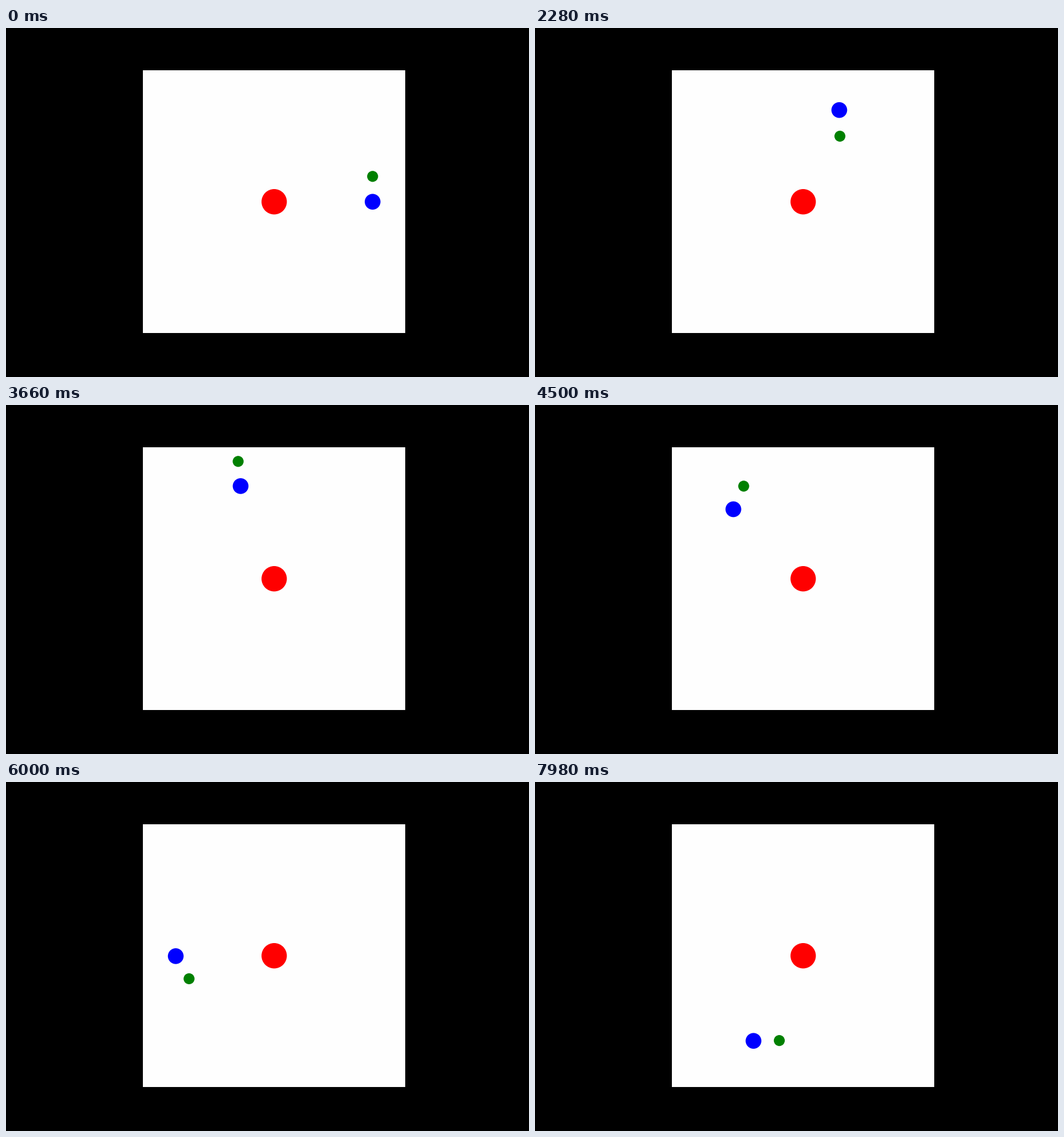
Animation of 917 by 611 pixels, one loop 8 s. Source, as a matplotlib script:

```python
import numpy as np
import matplotlib.pyplot as plt
from matplotlib.animation import FuncAnimation
from matplotlib.patches import Circle, Rectangle

W, H, DPI = 917, 611, 100
LOOP, TICK = 8000, 20      # ms
TICKS_PER_STEP = 3         # the bodies advance every 60 ms

SUN = np.array([470.2, 304.2])
PLANET_ORBIT = 172.6
MOON_ORBIT = 44.9
PLANET_RATE = np.radians(1.8022)   # per step
MOON_RATE = np.radians(23.712)
APSIS_RATE = np.radians(0.2)
ECC = 0.023


def polar(r, angle):
    return r * np.array([np.cos(angle), -np.sin(angle)])


def planet_at(step):
    return SUN + polar(PLANET_ORBIT, PLANET_RATE * step)


def moon_at(step):
    """Slightly eccentric orbit about the planet, disturbed by the sun's tide."""
    mean = np.pi / 2 + MOON_RATE * step
    anomaly = (MOON_RATE - APSIS_RATE) * step
    tide = 2 * (mean - PLANET_RATE * step - np.pi)
    angle = (mean + 2 * ECC * np.sin(anomaly)
             + 0.0105 * np.sin(tide)
             + 0.0087 * np.sin(tide - anomaly))
    r = MOON_ORBIT * (1 - ECC * np.cos(anomaly)
                      - 0.0077 * np.cos(tide)
                      - 0.004 * np.cos(tide - anomaly))
    return planet_at(step) + polar(r, angle)


fig = plt.figure(figsize=(W / DPI, H / DPI), dpi=DPI, facecolor="black")
ax = fig.add_axes([0, 0, 1, 1])
ax.set_xlim(0, W)
ax.set_ylim(H, 0)
ax.axis("off")

ax.add_patch(Rectangle((240, 74), 460, 459.7, fc="#fefefe", lw=0))


def disc(center, radius, color, z):
    return ax.add_patch(Circle(center, radius, fc=color, lw=0, zorder=z))


disc(SUN, 22.2, "#ff0000", 2)
planet = disc(planet_at(0), 13.8, "#0000ff", 3)
moon = disc(moon_at(0), 9.6, "#008000", 4)


def update(frame):
    step = frame // TICKS_PER_STEP
    planet.center = planet_at(step)
    moon.center = moon_at(step)
    return planet, moon


anim = FuncAnimation(fig, update, frames=LOOP // TICK, interval=TICK,
                     repeat=True, repeat_delay=0, blit=False)
plt.show()
```
